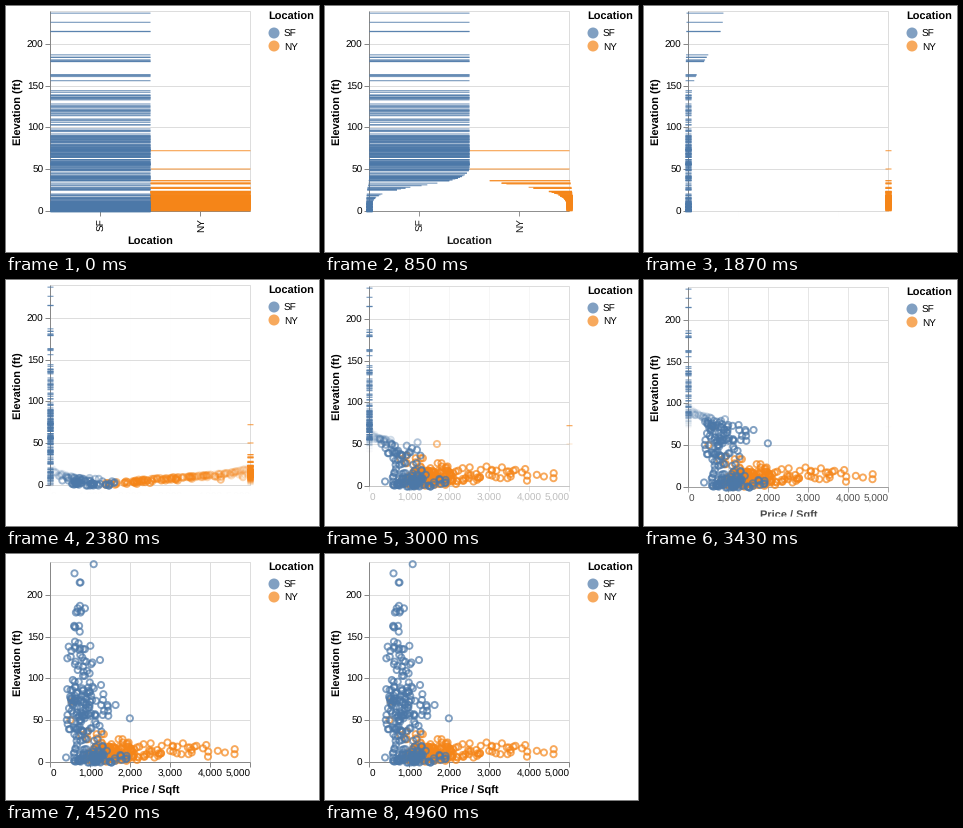
Write a matplotlib script that moves like this. It is 313 px wide and 246 px high and loops after 4980 ms.

```python
import numpy as np
import matplotlib.pyplot as plt
from matplotlib.animation import FuncAnimation
from matplotlib.collections import LineCollection
from matplotlib.colors import to_rgb
from matplotlib.patches import Circle, Rectangle
from matplotlib.transforms import Affine2D

W, H = 313, 246
LOOP, STEP = 4980, 20
PT = 0.72                      # points per pixel at 100 dpi
LEFT, TOP, SIZE = 44.5, 5.5, 200
RIGHT, BASE = LEFT + SIZE, TOP + SIZE
BLUE, ORANGE = "#4c78a8", "#f58518"
OPACITY = 0.7

plt.rcParams.update({"font.family": "Liberation Sans", "path.snap": False,
                     "text.hinting": "no_hinting", "text.kerning_factor": 0})

rng = np.random.default_rng(5)


# ---------- data: price in hundreds, elevation in feet ----------
def blob(n, price, skew, elev, spread):
    """Log-normal prices around a median, whole elevations above zero."""
    return np.column_stack([price * np.exp(rng.normal(0, skew, n)),
                            np.abs(np.round(rng.normal(elev, spread, n)))])


ny = np.vstack([
    blob(182, 16, 0.28, 11.5, 6),
    blob(26, 33, 0.2, 15, 5),
    blob(9, 10, 0.2, 33, 3),
    [(5.3, 73), (5, 51), (46, 10)],
])
sf = np.vstack([
    blob(85, 10, 0.32, 0, 8),
    blob(140, 7.8, 0.3, 65, 24),
    blob(22, 6.8, 0.25, 128, 9),
    blob(5, 6.3, 0.1, 162, 3),
    blob(7, 6.6, 0.12, 184, 5),
    [(10.8, 238), (6, 227), (7.5, 216), (7.3, 216)],
])
points = np.vstack([ny, sf])
is_ny = np.arange(len(points)) < len(ny)

elev = points[:, 1]
y = BASE - elev * SIZE / 240
band_x = np.where(is_ny, LEFT + 150, LEFT + 50)
edge_x = np.where(is_ny, RIGHT, LEFT)
price_x = LEFT + points[:, 0] * 4
# Stagger order: one slot per foot, fewer where the hills thin out.
thin = 1 - np.clip((238 - elev) / 128, 0, 1) ** 2.2
order = np.minimum(elev, 110) + 32 * thin
colors = np.ones((len(points), 4))
colors[:, :3] = np.where(is_ny[:, None], to_rgb(ORANGE), to_rgb(BLUE))


# ---------- timing ----------
def ease(t, start, length):
    u = np.clip((t - start) / length, 0, 1)
    return np.where(u < 0.5, 4 * u ** 3, 1 - 4 * (1 - u) ** 3)


def with_alpha(a):
    rgba = colors.copy()
    rgba[:, 3] = a
    return rgba


# ---------- stage ----------
fig = plt.figure(figsize=(W / 100, H / 100), dpi=100, facecolor="white")
ax = fig.add_axes([0, 0, 1, 1])
ax.axis("off")
shift = Affine2D()
place = shift + ax.transData


def line(x0, y0, x1, y1, color, z):
    return ax.plot([x0, x1], [y0, y1], color=color, lw=PT, zorder=z,
                   solid_capstyle="butt", transform=place)[0]


def label(x, base, text, size=10, **kw):
    return ax.text(x, base, text, fontsize=size * PT, color="black",
                   va="baseline", transform=place, zorder=3,
                   rotation_mode="anchor", **kw)


def title(x, base, text, **kw):
    return label(x, base, text, 11, weight="bold", **kw)


# plot frame and vertical axis
ax.add_patch(Rectangle((LEFT, TOP), SIZE, SIZE, fill=False, ec="#dddddd",
                       lw=PT, zorder=1, transform=place))
for value in range(0, 201, 50):
    ly = TOP + int(SIZE - value * SIZE / 240)
    line(LEFT, ly, RIGHT, ly, "#dddddd", 1)
    line(LEFT - 5, ly, LEFT, ly, "#888888", 2)
    label(LEFT - 7, ly + 3.5, str(value), ha="right")
line(LEFT, TOP, LEFT, BASE, "#888888", 2)
title(15.5, BASE - 100, "Elevation (ft)", rotation=90, ha="center")

# legend
title(262.5, 14.2, "Location")
for i, (name, color) in enumerate([("SF", BLUE), ("NY", ORANGE)]):
    cy = 27 + 13 * i
    ax.add_patch(Circle((268, cy), 5.5, fc=color, ec="none", alpha=OPACITY,
                        zorder=3, transform=place))
    label(278, cy + 3.5, name)

# category axis
place_axis = [line(LEFT, BASE, RIGHT, BASE, "#888888", 2),
              title(LEFT + 100, 239, "Location", ha="center")]
for name, x in [("SF", LEFT + 50), ("NY", LEFT + 150)]:
    place_axis += [line(x, BASE, x, BASE + 5, "#888888", 2),
                   label(x + 3.5, BASE + 7, name, rotation=90, ha="right")]

# price axis
price_axis = [line(LEFT, BASE, RIGHT, BASE, "#888888", 2),
              title(LEFT + 100, 236.5, "Price / Sqft", ha="center")]
for value in range(0, 5001, 1000):
    x = LEFT + value / 25
    align = {0: "left", 5000: "right"}.get(value, "center")
    price_axis += [line(x, TOP, x, BASE, "#dddddd", 1),
                   line(x, BASE, x, BASE + 5, "#888888", 2),
                   label(x, BASE + 14.7, f"{value:,}", ha=align)]

# marks
ticks = LineCollection([], linewidths=1.2 * PT, capstyle="butt", zorder=4,
                       transform=place)
ax.add_collection(ticks, autolim=False)
dots = ax.scatter(edge_x, y, s=(6.2 * PT) ** 2, facecolors="none",
                  linewidths=1.9 * PT, zorder=5, transform=place)

# hides what lies below the current view height
cover = ax.add_patch(Rectangle((0, H), W, 60, fc="white", ec="none",
                               zorder=10))
ax.set_xlim(0, W)
ax.set_ylim(H, 0)


def update(i):
    t = i * STEP
    leave = float(ease(t, 330, 1750))
    enter = float(ease(t, 2050, 2350))
    shift.clear().translate(0, round(3 * enter))
    for artist in place_axis:
        artist.set_alpha(1 - leave)
    for artist in price_axis:
        artist.set_alpha(enter)
    cover.set_y(H - 32.5 * (leave - enter))

    shrink = ease(t, 349 + order * 8.93, 430)
    cx = band_x + (edge_x - band_x) * shrink
    half = 50 - 47 * shrink
    ticks.set_segments(np.stack([np.column_stack([cx - half, y]),
                                 np.column_stack([cx + half, y])], axis=1))

    move = ease(t, 2005 + order * 13.9, 480)
    ticks.set_color(with_alpha(OPACITY * (1 - move)))
    dots.set_offsets(np.column_stack([edge_x + (price_x - edge_x) * move, y]))
    dots.set_edgecolor(with_alpha(OPACITY * move))
    return []


anim = FuncAnimation(fig, update, frames=LOOP // STEP, interval=STEP,
                     init_func=lambda: update(0), repeat=True,
                     repeat_delay=0, blit=False)
plt.show()
```
